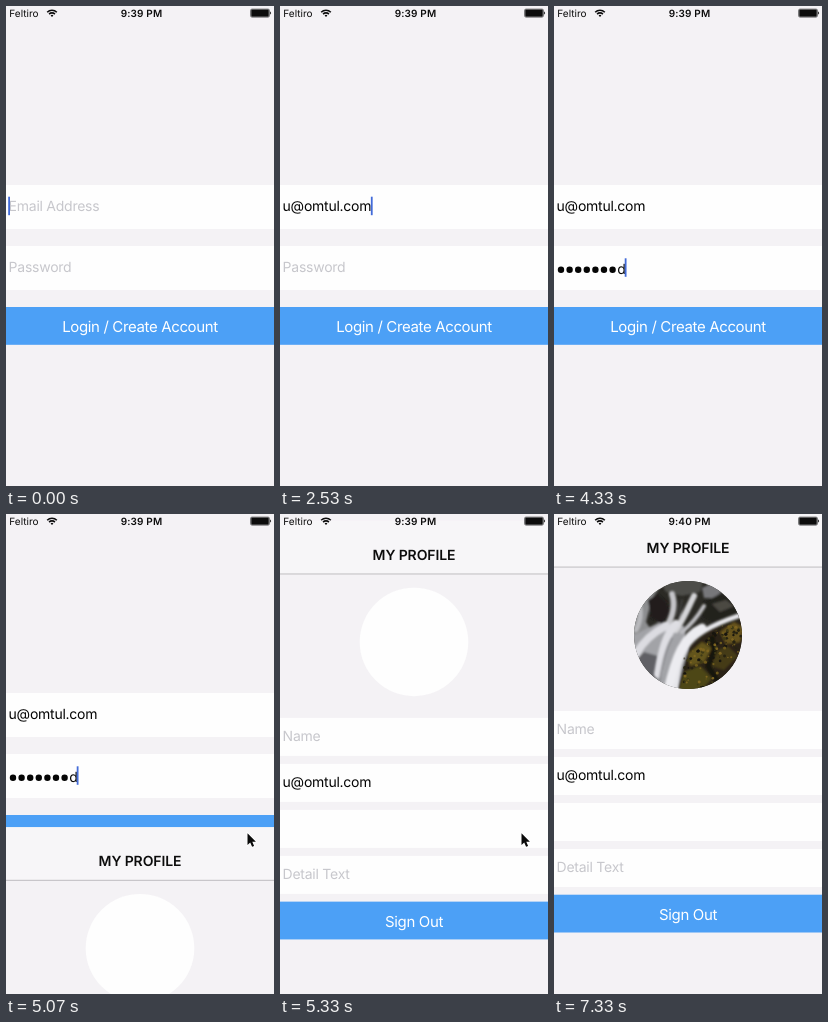
Recreate the animation shown at these times as an HTML page. Size 268 px wide and 480 px high, loop 7390 ms.

```html
<!DOCTYPE html>
<html lang="en">
<head>
<meta charset="utf-8">
<title>Login and profile</title>
<style>
  html, body { margin: 0; height: 100%; overflow: hidden; background: #f4f2f5; }
  svg { display: block; width: 100vw; height: 100vh; }
  text { font-family: Inter, "Open Sans", sans-serif; text-rendering: geometricPrecision; white-space: pre; }
  .field { font-size: 14px; letter-spacing: -.25px; fill: #050505; }
  .hint { fill: #c7c7cc; }
  .button { font-size: 15px; letter-spacing: -.36px; fill: #fff; text-anchor: middle; }
  .title { font-size: 14px; font-weight: 600; letter-spacing: -.1px; text-anchor: middle; fill: #0c0c0c; }
  .status { font-size: 10px; fill: #0c0c0c; }
  .clock { font-weight: 600; letter-spacing: .15px; text-anchor: middle; }
  .row { fill: #fefefe; }
  .blue { fill: #4ca0f6; }
  .page { fill: #f4f2f5; }
</style>
</head>
<body>
<svg viewBox="0 0 268 480" preserveAspectRatio="none">
  <defs>
    <clipPath id="round"><circle cx="134" cy="121" r="54"/></clipPath>
    <filter id="soft" x="-10%" y="-10%" width="120%" height="120%"><feGaussianBlur stdDeviation=".8"/></filter>
    <filter id="mist" x="-30%" y="-30%" width="160%" height="160%"><feGaussianBlur stdDeviation="1.3"/></filter>
  </defs>

  <rect class="page" width="268" height="480"/>
  <g id="login">
    <rect class="row" y="179" width="268" height="44"/>
    <rect class="row" y="240" width="268" height="44"/>
    <rect class="blue" y="301" width="268" height="37.8"/>
    <text class="field hint" id="mailHint" x="2.6" y="205.4">Email Address</text>
    <text class="field" id="mail" x="2.6" y="205.4"></text>
    <text class="field hint" id="passHint" x="2.6" y="266.4">Password</text>
    <g id="dots"></g>
    <text class="field" id="last" y="268"></text>
    <rect id="caret" width="1.8" height="18.5" fill="#426bd9"/>
    <text class="button" x="134" y="325.8">Login / Create Account</text>
  </g>

  <g id="profile">
    <rect class="page" width="268" height="480"/>
    <rect width="268" height="53" fill="#f7f6f8"/>
    <rect y="52.6" width="268" height=".9" fill="#b8b7ba"/>
    <text class="title" x="134" y="39.2">MY PROFILE</text>
    <circle cx="134" cy="121" r="54.3" fill="#fefefe"/>
    <g id="photo" clip-path="url(#round)">
      <rect x="78" y="65" width="112" height="112" fill="#2b2a25"/>
      <g filter="url(#soft)">
        <path d="M78 65H112L98 84 92 108 104 126 78 132Z" fill="#8d8e90"/>
        <path d="M78 122L106 108 130 112 134 136 122 180H78Z" fill="#a2a3a7"/>
        <path d="M78 150L90 138 104 142 102 180H78Z" fill="#606165"/>
        <path d="M94 86L104 80 113 88 116 98 108 110 97 104Z" fill="#201f1c"/>
        <path d="M104 65H150L146 78 128 82 112 78Z" fill="#4d4e49"/>
        <path d="M148 74L160 68 170 76 160 84 150 84Z" fill="#77777a"/>
        <path d="M150 88L166 80 182 88 186 102 158 108 148 104Z" fill="#24231f"/>
        <path d="M158 90L172 86 180 92 166 98Z" fill="#4b4942"/>
        <path d="M136 132L156 116 190 104V180H122L130 150Z" fill="#2a2412"/>
        <path d="M166 118L180 108 190 114 186 128 172 130Z" fill="#66521a"/>
        <path d="M134 140L148 128 158 134 150 148 136 152Z" fill="#64551a"/>
        <path d="M160 138L174 132 184 142 170 156 158 152Z" fill="#453b15"/>
        <path d="M130 158L146 152 158 164 146 178H124Z" fill="#4e4718"/>
        <path d="M158 122L160 138 154 152 164 168" fill="none" stroke="#14120c" stroke-width="5"/>
      </g>
      <g id="moss"></g>
      <g filter="url(#mist)" fill="none" stroke-linecap="round">
        <path d="M118 80C122 92 118 104 112 114" stroke="#c4c4c8" stroke-width="6"/>
        <path d="M140 82C134 94 130 104 122 116" stroke="#d4d4d7" stroke-width="6"/>
        <path d="M150 92C144 102 138 110 128 118" stroke="#bdbdc1" stroke-width="4"/>
        <path d="M128 86L125 102" stroke="#3a3a38" stroke-width="3"/>
        <path d="M184 102C160 110 140 120 132 134S124 156 121 178" stroke="#e6e6ea" stroke-width="5"/>
        <path d="M148 114C130 122 122 142 114 176" stroke="#ececf0" stroke-width="9"/>
        <path d="M122 110C112 120 108 136 104 160" stroke="#dedee3" stroke-width="8"/>
        <path d="M112 112C100 118 90 126 82 140" stroke="#dcdce1" stroke-width="8"/>
        <path d="M118 124C110 138 108 156 104 174" stroke="#88898d" stroke-width="2"/>
        <path d="M82 84C88 94 88 104 82 116" stroke="#b9babd" stroke-width="5"/>
      </g>
    </g>
    <rect class="row" y="197" width="268" height="38"/>
    <rect class="row" y="243" width="268" height="38"/>
    <rect class="row" y="289" width="268" height="38"/>
    <rect class="row" y="335" width="268" height="38"/>
    <rect class="blue" y="380.7" width="268" height="37.8"/>
    <text class="field hint" x="2.6" y="220.3">Name</text>
    <text class="field" id="mailRow" x="2.6" y="266.2"></text>
    <text class="field hint" x="2.6" y="358">Detail Text</text>
    <text class="button" x="134" y="405.8">Sign Out</text>
  </g>

  <text class="status" x="3.3" y="10.7">Feltiro</text>
  <g fill="none" stroke="#0c0c0c" stroke-width="1.6">
    <path d="M41.2 6.2A6.8 6.8 0 0 1 50.8 6.2"/>
    <path d="M43.1 8.1A4.1 4.1 0 0 1 48.9 8.1"/>
    <path d="M46 10.9L44.6 9.5A2 2 0 0 1 47.4 9.5Z" fill="#0c0c0c" stroke="none"/>
  </g>
  <text class="status clock" id="clock" x="135.5" y="10.7">9:39 PM</text>
  <rect x="244.5" y="3" width="19" height="8.2" rx="1.6" fill="#8a8a8c" stroke="#4a4a4c" stroke-width=".6"/>
  <rect x="245.4" y="3.8" width="17.2" height="6.6" rx=".8" fill="#0c0c0c"/>
  <path d="M264.2 5.6A1.7 1.7 0 0 1 264.2 8.6Z" fill="#0c0c0c"/>
  <path id="pointer" d="M0 0V11.8L2.7 9.2 4.6 13.6 6.6 12.8 4.8 8.5H8.4Z" fill="#0a0a0a" stroke="#fff" stroke-width="1.6" paint-order="stroke"/>
</svg>

<script>
const LOOP = 7390, STEP = 200 / 3, PITCH = 8.6;
const MAIL = "u@omtul.com", PASS = "password";
const mailKeys = [670, 1070, 1330, 1530, 1800, 1930, 2070, 2200, 2270, 2330, 2400];
const passKeys = [2800, 2930, 3070, 3200, 3270, 3400, 3730, 4070];
const FOCUS = 2600, SLIDE = 5001, SPRING = 18.7, PHOTO = 5660;
// time, x, y
const pointerPath = [[4460, 270, 306], [4670, 252, 316], [4800, 241.5, 319.2], [5400, 241.5, 319.2], [5560, 270, 319.2]];

const el = {};
for (const node of document.querySelectorAll("[id]")) el[node.id] = node;
const clamp = v => Math.min(1, Math.max(0, v));
const show = (node, on) => node.setAttribute("visibility", on ? "visible" : "hidden");
const move = (node, x, y) => node.setAttribute("transform", `translate(${x} ${y})`);
const setText = (node, s) => { if (node.textContent !== s) node.textContent = s; };

function circle(parent, cx, cy, r, fill) {
  const c = document.createElementNS("http://www.w3.org/2000/svg", "circle");
  for (const [k, v] of Object.entries({ cx, cy, r, fill })) c.setAttribute(k, v);
  parent.append(c);
  return c;
}

const dots = [...PASS].map((_, i) => circle(el.dots, 7 + PITCH * i, 263.8, 3.2, "#050505"));

let seed = 11;
const rand = () => (seed = seed * 16807 % 2147483647) / 2147483647;
const mossColors = ["#6e5a1c", "#3f3a16", "#17150e", "#7d6420", "#262211"];
for (let i = 0; i < 150; i++) {
  const y = 112 + rand() * 64;
  const left = Math.max(130, 168 - (y - 112) * 1.3);
  circle(el.moss, left + rand() * (188 - left), y, .5 + rand() * 1.3, mossColors[i % 5]);
}

setText(el.mailRow, MAIL);

function drawCaret(t, typed, passTyped) {
  const inPass = t >= FOCUS;
  const keys = [0, ...mailKeys, FOCUS, ...passKeys].filter(k => k <= t);
  const age = t - keys[keys.length - 1];
  const blink = age < 420 ? 1 : clamp(.5 + 1.5 * Math.cos((age - 200) * Math.PI / 500));
  let x = 2.2;
  if (inPass && passTyped) x += PITCH * (passTyped - 1) + el.last.getComputedTextLength();
  else if (!inPass && typed) x += el.mail.getComputedTextLength();
  el.caret.setAttribute("x", x);
  el.caret.setAttribute("y", inPass ? 252.3 : 190.7);
  el.caret.setAttribute("opacity", blink);
}

function drawPointer(t) {
  const i = pointerPath.findIndex(p => p[0] > t);
  show(el.pointer, i > 0);
  if (i < 1) return;
  const [t0, x0, y0] = pointerPath[i - 1], [t1, x1, y1] = pointerPath[i];
  const p = (t - t0) / (t1 - t0);
  move(el.pointer, x0 + (x1 - x0) * p, y0 + (y1 - y0) * p);
}

function draw(t) {
  const count = keys => keys.filter(k => k <= t + 5).length;
  const typed = count(mailKeys), passTyped = count(passKeys);
  setText(el.mail, MAIL.slice(0, typed));
  show(el.mailHint, !typed);
  show(el.passHint, !passTyped);
  dots.forEach((d, i) => show(d, i < passTyped - 1));
  setText(el.last, passTyped ? PASS[passTyped - 1] : "");
  el.last.setAttribute("x", 3 + PITCH * Math.max(0, passTyped - 1));
  drawCaret(t + 5, typed, passTyped);
  drawPointer(t);

  const u = Math.max(0, t - SLIDE) / 1000 * SPRING;
  const top = 480 * (1 + u) * Math.exp(-u);
  show(el.profile, u > 0);
  move(el.profile, 0, top < .4 ? 0 : top);

  const later = t >= PHOTO;
  el.photo.style.display = later ? "" : "none";
  setText(el.clock, later ? "9:40 PM" : "9:39 PM");
}

const start = performance.now();
function tick() {
  const now = (performance.now() - start) % LOOP;
  draw(Math.floor((now + 4) / STEP) * STEP);
  requestAnimationFrame(tick);
}
tick();
</script>
</body>
</html>
```
